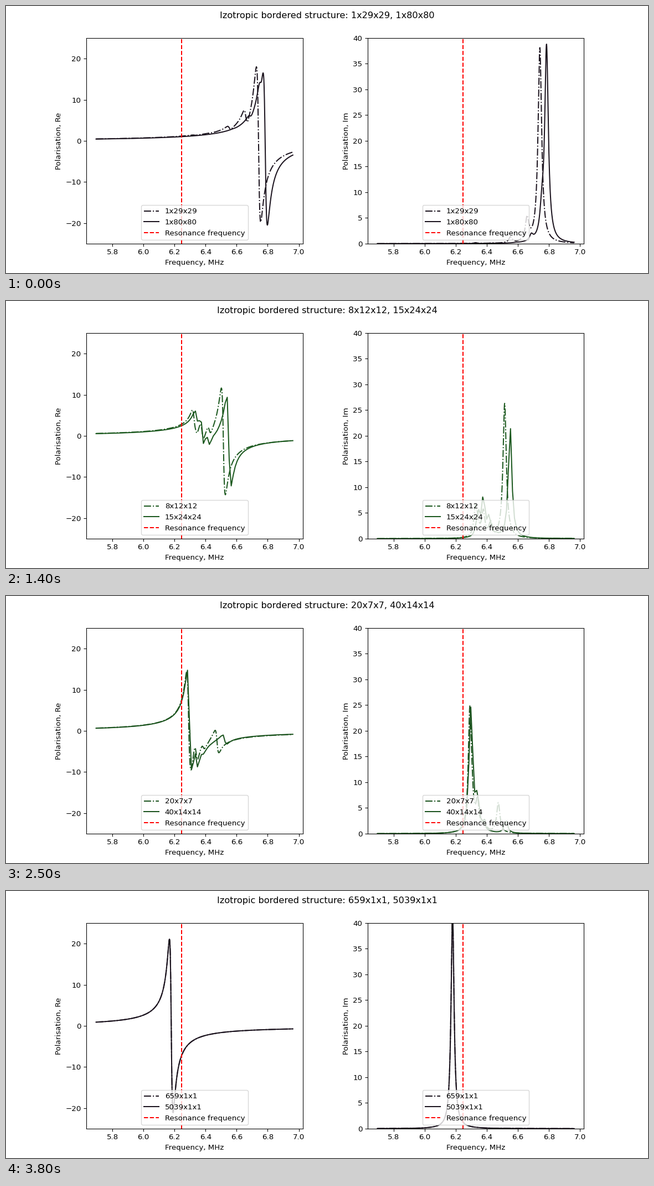
Animation of 1159 by 483 pixels, one loop 3.9 s. Source, as a matplotlib script:

```python
import math

import matplotlib.pyplot as plt
import numpy as np
from matplotlib.animation import FuncAnimation

FRAMES, INTERVAL = 39, 100
SIDE = 20                      # the middle shape is a cube of this side
MID = SIDE - 1
F_START, F_END = 5.695, 6.9617
F_RES, F_ROD = 6.2456, 6.179
LOSS = 6.074e-4                # line width of a mode is LOSS * f**2
FINE = np.linspace(F_START, F_END, 1000)
COARSE = np.linspace(F_START, F_END, 100)

# Each "fall" is the (scale, power) of a stretched exponential.
SMALL = dict(side=SIDE // 2, slab_f=6.493, slab_rise=0.248, slab_fall=(0.187, 1.2),
             sag=0.25, slab_h=38, slab_fade=(0.541, 3),
             rod_rise=0.148, rod_fall=(0.283, 2), rod_fade=(0.42, 2),
             parts=4, bunch=0.6, drift=2.0)
LARGE = dict(side=SIDE, slab_f=6.537, slab_rise=0.247, slab_fall=(0.17, 1.4),
             sag=0.18, slab_h=38, slab_fade=(0.461, 2.8),
             rod_rise=0.16, rod_fall=(0.30, 1.8), rod_fade=(0.375, 2.7),
             parts=5, bunch=1.1, drift=3.6)


def fall(x, scale, power):
    return math.exp(-(x / scale) ** power)


def ring_count(n, m):
    """Rings on all faces of an n x m x m block of cells."""
    return (n + 1) * m * m + 2 * n * m * (m + 1)


def shape(step, side):
    """Block with about as many rings as the cube: first flat, later long."""
    limit = ring_count(side, side)
    if step < side:
        n, m = step + 1, 1
        while ring_count(n, m) < limit:
            m += 1
    else:
        n, m = 1, 2 * side - 1 - step
        while ring_count(n + 1, m) <= limit:
            n += 1
    return n, m


def modes(t, p):
    """(frequency, height) of each mode; t runs from slab (0) to rod (1)."""
    slab_f = p["slab_f"] + p["slab_rise"] * fall(t, *p["slab_fall"]) - p["sag"] * t ** 6
    slab_h = p["slab_h"] * fall(t, *p["slab_fade"])
    rod_f = F_ROD + p["rod_rise"] * (1 - fall(1 - t, *p["rod_fall"]))
    rod_h = 42.2 * fall(1 - t, *p["rod_fade"])

    # The remaining strength sits in satellites between the two main modes.
    rest = 0.75 * max(0, 42.2 + 3.5 * (1 - t) - slab_h - rod_h)
    k = np.arange(1, p["parts"])
    spread = (k / p["parts"]) ** (0.6 + p["bunch"] * math.exp(-t / 0.06))
    centre = 0.5 + p["drift"] * (1 - math.exp(-t / 0.3))
    weight = np.exp(-((k - centre) / 0.85) ** 2 / 2)
    sat_f = slab_f - (slab_f - rod_f + 0.02) * spread
    sat_h = rest * weight / weight.sum()
    return [(slab_f, slab_h), (rod_f, rod_h), *zip(sat_f, sat_h)]


def response(f, step, p):
    """Sum of damped resonances."""
    total = np.zeros_like(f, dtype=complex)
    for fk, h in modes(step / (2 * p["side"] - 2), p):
        width = LOSS * fk ** 2
        total += h * width * f ** 2 / fk / (fk ** 2 - f ** 2 - 1j * width * f)
    return total


def shade(i):
    green = 0.08 + 0.16 * (1 + math.cos(math.pi * (i - MID) / MID))
    return (0.11, green, 0.12)


fig, axes = plt.subplots(1, 2, figsize=(12, 5), dpi=96.61)
fig.subplots_adjust(left=0.125, right=0.9, bottom=0.11, top=0.88, wspace=0.3)
title = fig.suptitle("Izotropic bordered structure:")

panels = []
for ax, part, limits in zip(axes, ("Re", "Im"), ((-25, 25), (0, 40))):
    dashed, = ax.plot([], [], "-.", label="small")
    solid, = ax.plot([], [], "-", label="large")
    ax.axvline(F_RES, color="red", ls="--", label="Resonance frequency")
    ax.set_xlim(5.632, 7.025)
    ax.set_ylim(*limits)
    ax.set_xlabel("Frequency, MHz")
    ax.set_ylabel(f"Polarisation, {part}")
    legend = ax.legend(loc="lower center")
    panels.append((dashed, solid, legend))


def draw(i):
    half = i // 2 if i < SIDE else (i - 1) // 2
    blocks = shape(half, SMALL["side"]), shape(i, LARGE["side"])
    names = ["{0}x{1}x{1}".format(*b) for b in blocks]
    title.set_text("Izotropic bordered structure: " + ", ".join(names))

    grid = COARSE if 2 <= i <= 25 else FINE
    p_small = response(FINE, half, SMALL)
    p_large = response(grid, i, LARGE)
    color = shade(i)
    for (dashed, solid, legend), part in zip(panels, (np.real, np.imag)):
        dashed.set_data(FINE, part(p_small))
        solid.set_data(grid, part(p_large))
        for line in (dashed, solid, *legend.get_lines()[:2]):
            line.set_color(color)
        for text, name in zip(legend.get_texts(), names):
            text.set_text(name)
    return []


anim = FuncAnimation(fig, draw, frames=FRAMES, interval=INTERVAL, repeat=True)
plt.show()
```
